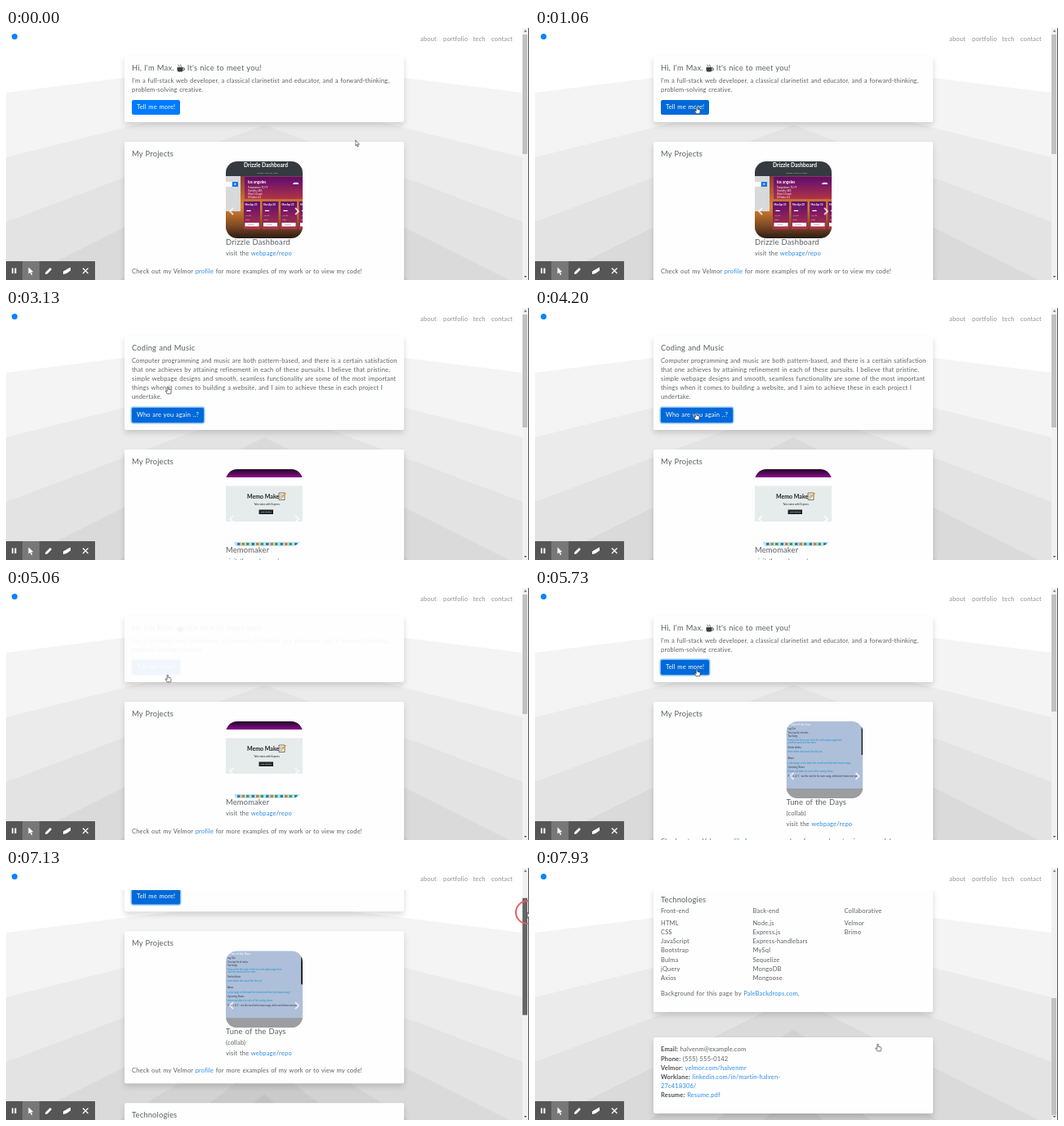
These frames come from a looping animation (640x308 px, 8 s). An HTML page:

```html
<!DOCTYPE html>
<html lang="en">
<head>
<meta charset="utf-8">
<title>Portfolio</title>
<style>
html, body { margin: 0; width: 100%; height: 100%; overflow: hidden; background: #fff; }
#stage {
  position: relative; width: 640px; height: 308px; overflow: hidden;
  font: 7.5px/11.2px Lato, "Open Sans", sans-serif;
  letter-spacing: .18px; word-spacing: .5px; color: #5b5f63; white-space: nowrap;
}
#stage > *, .abs, .card > * { position: absolute; }
svg { display: block; overflow: visible; letter-spacing: 0; word-spacing: 0; }
p, h2 { margin: 0; font-weight: 400; }
h2 { font-size: 9.35px; }
a { color: #2b8be8; }
b { font-weight: 700; color: #4a4e52; }

/* every animation shares the same 8 s clock */
.anim, .hard { animation: 8s ease-in-out infinite; }
.hard { animation-timing-function: step-end; }

#nav { left: 0; top: 0; width: 632px; height: 27px; background: #fff; color: #8b8d90; }
#nav span { position: absolute; top: 7.9px; }
#logo { left: 7px; top: 6.5px; width: 7px; height: 7px; border-radius: 50%; background: #0a84ff; position: absolute; }

#page { left: 145px; top: 0; width: 341.5px; padding-top: 34px; animation-name: scroll; }
.card {
  position: relative; margin-bottom: 24px; border-radius: 2px;
  background: #fefefe; box-shadow: 0 3.7px 7.5px rgba(0,0,0,.15);
}
.card h2 { left: 9px; top: 9.4px; }
.card p { left: 9px; }
#hello { height: 81px; animation-name: grow; }
#work { height: 174px; animation-name: work; }
#tech { height: 152px; margin-bottom: 31px; }
#contact { height: 93px; }

.btn {
  position: absolute; left: 9px; height: 17.8px; line-height: 17.8px; padding: 0 6px;
  border-radius: 2px; color: #fff; background: #007bff;
}
#more { top: 54px; animation-name: press; }
#again { top: 88px; background: #0069d9; box-shadow: 0 0 0 1.4px rgba(0,123,255,.5); }
#intro, #music { left: 0; top: 0; }
#intro { animation-name: intro; }
#music { animation-name: music; }
.mug { display: inline-block; vertical-align: -1.5px; }

#slides { left: 9px; top: 24px; width: 323px; height: 132px; overflow: hidden; }
.slide { position: absolute; left: 115px; top: 0; }
.slide h2 { position: absolute; left: 0; top: 93.4px; }
.slide p { position: absolute; left: 0; top: 107.4px; line-height: 12.8px; }
.pic { width: 94px; height: 94px; border-radius: 14px; overflow: hidden; }
.arrows { position: absolute; left: 0; fill: none; stroke: #fff; stroke-width: 1.8; opacity: .75; }
#s1 { animation-name: s1; }
#s2 { animation-name: s2; }
#s3 { animation-name: s3; }
#check { top: 153.4px; animation-name: check; }

#track { left: 631.5px; top: 0; width: 8.5px; height: 308px; background: #f1f1f1; }
#thumb { left: 632px; top: 8px; width: 6px; animation-name: thumbSize; }
#grip { animation-name: thumbMove; width: 6px; height: 100%; }
#grip i { display: block; height: 100%; animation-name: grip; }
#edge { left: 639px; top: 0; width: 1px; height: 308px; background: #555; }

#bar { left: 0; top: 285px; width: 108.5px; height: 23px; background: #565656; }
#pointer { left: 0; top: 0; animation-name: move; }
#arrow { animation-name: arrow; }
#hand { animation-name: hand; }
#halo { animation-name: halo; }

@keyframes scroll { 0%, 86.6% { transform: none } 95%, 100% { transform: translateY(-325px) } }
@keyframes grow { 0%, 61.6% { height: 81px } 25% { height: 115px } 61.6%, 100% { height: 81px } 0% { height: 81px } }
@keyframes work { 0% { height: 174px } 65.94%, 100% { height: 186px } }
@keyframes check { 0% { top: 153.4px } 65.94%, 100% { top: 165.4px } }
@keyframes press {
  0% { background: #007bff; box-shadow: none }
  11.6% { background: #0069d9; box-shadow: none }
  18.25%, 100% { background: #0069d9; box-shadow: 0 0 0 1.4px rgba(0,123,255,.5) }
}
@keyframes intro { 0%, 18.25% { opacity: 1 } 25%, 62% { opacity: 0 } 70%, 100% { opacity: 1 } }
@keyframes music { 0%, 25.2% { opacity: 0 } 36.25%, 55% { opacity: 1 } 61.6%, 100% { opacity: 0 } }
@keyframes s1 { 0%, 18.25% { transform: none } 25.5%, 100% { transform: translateX(-323px) } }
@keyframes s2 {
  0%, 18.25% { transform: translateX(323px) } 25.5%, 65.94% { transform: none }
  73.44%, 100% { transform: translateX(-323px) }
}
@keyframes s3 { 0%, 65.94% { transform: translateX(323px) } 73.44%, 100% { transform: none } }
@keyframes thumbSize {
  0% { height: 145.5px } 25% { height: 138px } 61.6% { height: 145.5px } 65.94%, 100% { height: 143px }
}
@keyframes thumbMove { 0%, 86.6% { transform: none } 95%, 100% { transform: translateY(151px) } }
@keyframes grip { 0% { background: #c1c1c1 } 85.75% { background: #666 } 95.75%, 100% { background: #c1c1c1 } }
@keyframes move {
  0%, .75% { transform: translate(427.5px, 137px) }
  11% { transform: translate(201px, 98px) }
  13.25%, 41.25% { transform: translate(198px, 96px) }
  50% { transform: translate(198px, 127px) }
  52.5%, 58% { transform: translate(197px, 128px) }
  66%, 73.75% { transform: translate(198px, 99px) }
  80%, 86.6% { transform: translate(638px, 25.5px) }
  95%, 95.75% { transform: translate(638px, 176.5px) }
  99.1%, 100% { transform: translate(419.5px, 215px) }
}
@keyframes arrow { 0% { opacity: 1 } 10.2% { opacity: 0 } 74.5% { opacity: 1 } 98.5%, 100% { opacity: 0 } }
@keyframes hand { 0% { opacity: 0 } 10.2% { opacity: 1 } 74.5% { opacity: 0 } 98.5%, 100% { opacity: 1 } }
@keyframes halo { 0% { opacity: 0 } 85.75% { opacity: 1 } 95.75%, 100% { opacity: 0 } }
</style>
</head>
<body>
<div id="stage">
  <svg width="632" height="316" viewBox="0 0 1600 800">
    <path fill="#f4f4f4" d="M800 100 0 200V800H1600V200Z"/>
    <path fill="#ebebeb" d="M800 200 0 400V800H1600V400Z"/>
    <path fill="#e3e3e3" d="M800 300 0 600V800H1600V600Z"/>
    <path fill="#dadada" d="M1600 800 800 400 0 800Z"/>
    <path fill="#d2d2d2" d="M1280 800 800 500 320 800Z"/>
    <path fill="#cacaca" d="M533 800H1067L800 600Z"/>
    <path fill="#c2c2c2" d="M684 800H914L800 700Z"/>
  </svg>

  <div id="page" class="anim">
    <div id="hello" class="card hard">
      <div id="intro" class="anim">
        <h2 class="abs">Hi, I'm Max.
          <svg class="mug" width="10" height="10" viewBox="0 0 20 20" fill="#3c4043">
            <path d="M1 8H15V15Q15 19 11 19H5Q1 19 1 15ZM4 1Q4 3 6 4 7 5 7 7H5.500Q5 5 4 4 3 3 3 1ZM9 1Q9 3 11 4 12 5 12 7H10.500Q10 5 9 4 8 3 8 1Z"/>
            <path d="M15 9.500H16A3 3 0 0 1 16 15.500H15" fill="none" stroke="#3c4043" stroke-width="2"/>
          </svg>
          It's nice to meet you!</h2>
        <p class="abs" style="top:24.6px">I'm a full-stack web developer, a classical clarinetist and educator, and a forward-thinking,<br>problem-solving creative.</p>
        <span id="more" class="btn hard">Tell me more!</span>
      </div>
      <div id="music" class="anim">
        <h2 class="abs">Coding and Music</h2>
        <p class="abs" style="top:24.6px">Computer programming and music are both pattern-based, and there is a certain satisfaction<br>that one achieves by attaining refinement in each of these pursuits. I believe that pristine,<br>simple webpage designs and smooth, seamless functionality are some of the most important<br>things when it comes to building a website, and I aim to achieve these in each project I<br>undertake.</p>
        <span id="again" class="btn">Who are you again ..?</span>
      </div>
    </div>

    <div id="work" class="card hard">
      <h2>My Projects</h2>
      <div id="slides">
        <div id="s1" class="slide anim">
          <div class="pic"><svg width="94" height="94" fill="#fff">
            <defs>
              <linearGradient id="dusk" x2="0" y2="1">
                <stop stop-color="#8a3a3a"/><stop offset=".5" stop-color="#d9822f"/>
                <stop offset=".8" stop-color="#7d4a24"/><stop offset="1" stop-color="#2c1b16"/>
              </linearGradient>
              <linearGradient id="plum" x2="0" y2="1">
                <stop stop-color="#5d0c72"/><stop offset="1" stop-color="#b23345"/>
              </linearGradient>
              <g id="day">
                <path fill="url(#plum)" d="M0 0H20V34H0Z"/>
                <text x="1.500" y="5" font-size="2.800" font-weight="700">Mon Apr 20</text>
                <path d="M3 12a2 2 0 0 1 3-1 2 2 0 0 1 3 1z"/>
                <text x="2" y="18" font-size="2.500">72.3°F</text>
                <text x="2" y="23" font-size="2.500">48%</text>
                <path d="M1.500 26H18.500V30.500H1.500Z"/>
                <text x="5" y="29.300" font-size="2.500" fill="#555">Details</text>
              </g>
            </defs>
            <path fill="url(#dusk)" d="M0 18H94V94H0Z"/>
            <path fill="#343a40" d="M0 0H94V18H0Z"/>
            <text x="49" y="7" font-size="6.600" font-weight="700" text-anchor="middle">Drizzle Dashboard</text>
            <text x="51" y="15" font-size="2.600" text-anchor="middle" fill="#c5c8ca">Sunday, April 19, 2020</text>
            <path fill="#d7d9db" d="M0 18H18V61H0Z"/>
            <path d="M0 25H7V31H0Z"/>
            <path fill="#1479ea" d="M8 25H15V31H8Z"/>
            <circle cx="11.300" cy="27.800" r="1"/>
            <path fill="url(#plum)" d="M23 19H94V46H23Z"/>
            <text x="27" y="27" font-size="4.600" font-weight="700">los angeles</text>
            <path d="M82 28a3 3 0 0 1 4-2 2 2 0 0 1 3 2z"/>
            <g font-size="2.700">
              <text x="27" y="32.500">Temperature: 72.5°F</text><text x="27" y="36.500">Humidity: 48%</text>
              <text x="27" y="40.500">Wind: 5.8 mph</text><text x="27" y="44.500">UV Index: 8.4</text>
            </g>
            <use href="#day" x="22" y="49"/><use href="#day" x="44.500" y="49"/>
            <use href="#day" x="67" y="49"/><use href="#day" x="89.500" y="49"/>
          </svg></div>
          <svg class="arrows" style="top:61px" width="94" height="1"><path d="M9-4 5 0 9 4M85-4 89 0 85 4"/></svg>
          <h2>Drizzle Dashboard</h2>
          <p>visit the <a>webpage</a>/<a>repo</a></p>
        </div>

        <div id="s2" class="slide anim">
          <div class="pic"><svg width="94" height="94">
            <linearGradient id="night" x2="0" y2="1"><stop stop-color="#1c0a24"/><stop offset="1" stop-color="#8a0a8c"/></linearGradient>
            <path fill="#fefefe" d="M0 0H94V94H0Z"/>
            <path fill="url(#night)" d="M0 0H94V10H0Z"/>
            <path fill="#e6ecec" d="M0 20.500H94V64H0Z"/>
            <text x="26" y="35.500" font-size="7" font-weight="700" fill="#222">Memo Maker</text>
            <path fill="#f5f2e4" stroke="#444" stroke-width=".7" d="M65 29H72V37.500H65Z"/>
            <path stroke="#777" stroke-width=".6" d="M66 31.500H70M66 33.500H70M66 35.500H69"/>
            <path stroke="#e5a22b" stroke-width="1.500" d="M68.500 34.500 73.500 29"/>
            <text x="50" y="43.500" font-size="3" text-anchor="middle" fill="#222">Take notes with Express</text>
            <path fill="#20252a" d="M40.500 49.500H58V55H40.500Z"/>
            <text x="49.300" y="53.200" font-size="2.600" text-anchor="middle" fill="#fff">Get Started</text>
            <path fill="#bfe3e0" d="M10 89H91L88 94H12Z"/>
            <g stroke-width="3.200" stroke-dasharray="3.500 14">
              <path stroke="#2c7ac9" d="M14 91.500H88"/><path stroke="#d9773a" d="M19.500 91.500H88"/>
              <path stroke="#3c9d72" d="M25 91.500H88"/>
            </g>
          </svg></div>
          <svg class="arrows" style="top:61px" width="94" height="1"><path d="M9-4 5 0 9 4M85-4 89 0 85 4"/></svg>
          <h2>Memomaker</h2>
          <p>visit the <a>webpage</a>/<a>repo</a></p>
        </div>

        <div id="s3" class="slide anim">
          <div class="pic"><svg width="94" height="94" font-size="2.700" fill="#2f3a4a">
            <path fill="#aebfd9" d="M0 0H94V94H0Z"/>
            <path fill="#9b9da0" d="M0 82H94V94H0Z"/>
            <path fill="#25282c" d="M92 7H94V41H92Z"/>
            <text x="5" y="5" font-size="3.400" fill="#fff">Tune of the Days</text>
            <text x="2" y="10">Log Out</text><text x="2" y="14.500">Your top list of tracks</text>
            <text x="2" y="19">Top Songs</text><text x="2" y="32.500">Similar Artists</text>
            <text x="2" y="46">About</text><text x="2" y="57">Upcoming Shows</text>
            <text x="2" y="67.500">Page 1 of 3 – see the next list for more songs, artists and shows near you</text>
            <g fill="#1b93cf">
              <text x="2" y="23.500">listen to the first track of the list on the player page here</text>
              <text x="2" y="27">read the words and the notes</text><text x="2" y="38">more artists that sound like this one</text>
              <text x="2" y="51.500">a short page on the band, the records and their best known songs</text>
              <text x="2" y="62">tickets and dates for each of the coming shows</text>
            </g>
          </svg></div>
          <svg class="arrows" style="top:67px" width="94" height="1"><path d="M9-4 5 0 9 4M85-4 89 0 85 4"/></svg>
          <h2>Tune of the Days</h2>
          <p>(collab)<br>visit the <a>webpage</a>/<a>repo</a></p>
        </div>
      </div>
      <p id="check" class="hard">Check out my Velmor <a>profile</a> for more examples of my work or to view my code!</p>
    </div>

    <div id="tech" class="card">
      <h2>Technologies</h2>
      <p style="top:23.4px">Front-end</p>
      <p style="top:37.7px">HTML<br>CSS<br>JavaScript<br>Bootstrap<br>Bulma<br>jQuery<br>Axios</p>
      <p style="top:23.4px;left:121.5px">Back-end</p>
      <p style="top:37.7px;left:121.5px">Node.js<br>Express.js<br>Express-handlebars<br>MySql<br>Sequelize<br>MongoDB<br>Mongoose</p>
      <p style="top:23.4px;left:233.5px">Collaborative</p>
      <p style="top:37.7px;left:233.5px">Velmor<br>Brimo</p>
      <p style="top:124.2px">Background for this page by <a>PaleBackdrops.com</a>.</p>
    </div>

    <div id="contact" class="card">
      <p style="top:9.4px"><b>Email:</b> halvenm@example.com<br><b>Phone:</b> (555) 555-0142<br><b>Velmor:</b> <a>velmor.com/halvenmr</a><br><b>Worklane:</b> <a>linkedin.com/in/martin-halven-<br>27c418306/</a><br><b>Resume:</b> <a>Resume.pdf</a></p>
    </div>
  </div>

  <div id="nav">
    <i id="logo"></i>
    <span style="left:507px">about</span><span style="left:535px">portfolio</span>
    <span style="left:571.5px">tech</span><span style="left:594px">contact</span>
  </div>

  <div id="track"><svg width="8" height="308" fill="#555"><path d="M1.800 4.500 3.600 2.500 5.400 4.500ZM1.800 303 3.600 305 5.400 303Z"/></svg></div>
  <div id="thumb" class="hard"><div id="grip" class="anim"><i class="hard"></i></div></div>
  <div id="edge"></div>

  <div id="bar"><svg width="108" height="23" fill="#fff">
    <path fill="#787878" d="M20 0H41V23H20Z"/>
    <path d="M7 8.500H9V15H7ZM10.500 8.500H12.500V15H10.500Z"/>
    <path d="M27.500 7.500V15.500L29.500 13.800 31 17 32.300 16.400 30.900 13.300H33.500Z"/>
    <path d="M48 16 48.600 13.300 54 8 56 10 50.600 15.400Z"/>
    <path d="M70 16V12.500L76 9 79 7.500V11.500L74 15Z"/>
    <path d="M94 8.500 100.500 15M100.500 8.500 94 15" stroke="#fff" stroke-width="1.300"/>
  </svg></div>

  <div id="pointer" class="anim"><svg width="1" height="1" stroke="#333" stroke-width=".7" fill="#fff" stroke-linejoin="round">
    <circle id="halo" class="hard" r="14" fill="none" stroke="#e0605f" stroke-width="2"/>
    <path id="arrow" class="hard" d="M0 0V7L1.600 5.600 2.700 8.200 3.700 7.700 2.600 5.200H4.800Z"/>
    <path id="hand" class="hard" d="M-.8 .6Q0-.6 .8 .6V3.300L3.400 3.900Q4.300 4.200 4.200 5.200L3.700 8.800H-.6L-2.600 5.800Q-2.900 4.800-1.900 4.900L-.8 5.800Z"/>
  </svg></div>
</div>
</body>
</html>
```
